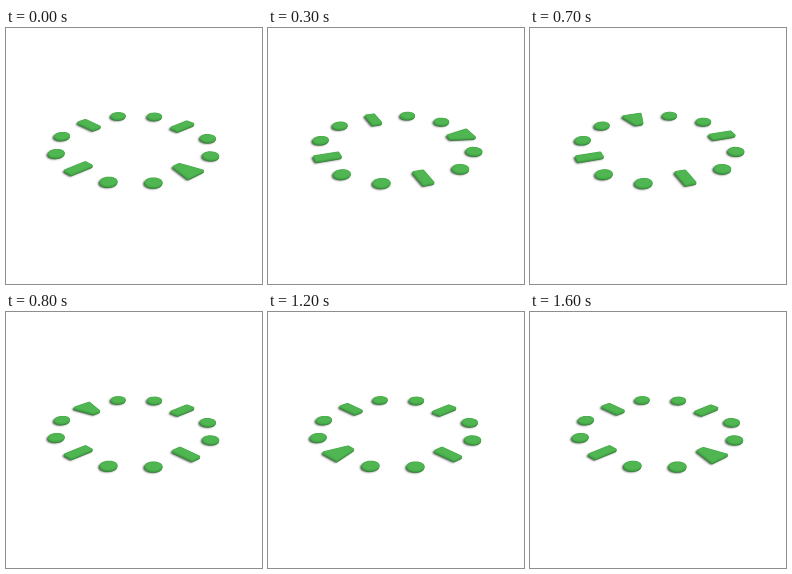
An HTML page with a canvas that plays this animation: 256x256 px, repeating every 1700 ms.

```html
<!DOCTYPE html>
<html lang="en">
<head>
<meta charset="utf-8">
<title>Rotating dial</title>
<style>
  html, body { margin: 0; width: 100%; height: 100%; overflow: hidden; background: #fff; }
  canvas { display: block; width: 256px; height: 256px; }
</style>
</head>
<body>
<canvas id="stage" width="256" height="256"></canvas>
<script>
const ctx = document.getElementById('stage').getContext('2d');
const RAD = Math.PI / 180;
const STEP = 100, LOOP = 1700, TURN = 22.5, START = 47;

// Stacked from the ground up: x shift, y shift, outline width, colour, shadow
const LAYERS = [
  [-0.4, 0.7, 2.8, '#3c7d40', 'rgba(0, 0, 0, 0.5)'],
  [-0.1, 0.1, 2.8, '#3b9a3f', 'transparent'],
  [0.1, -0.6, 2.6, '#48ac4a', 'transparent'],
  [0.2, -0.9, 0.8, '#50b652', 'transparent'],
];

// Perspective view of the ground plane; the dial has radius 1
function project(x, z) {
  const depth = 1 - 0.102 * z;
  return [128 + 71.75 * x / depth, 118.1 + 31.2 * z / depth];
}

const bar = (inner, outer) => [[0.82, -inner], [1.15, -outer], [1.15, outer], [0.82, inner]];

const dot = Array.from({ length: 24 }, (_, i) => [
  1.083 + 0.095 * Math.cos(i * 15 * RAD),
  0.095 * Math.sin(i * 15 * RAD),
]);

const marks = Array.from({ length: 12 }, (_, i) =>
  i === 0 ? bar(0.05, 0.135) : i % 3 ? dot : bar(0.062, 0.062));

function drawMark(shape, angle) {
  const c = Math.cos(angle), s = Math.sin(angle);
  const points = shape.map(([r, w]) => project(r * c - w * s, r * s + w * c));
  for (const [dx, dy, width, colour, shadow] of LAYERS) {
    ctx.beginPath();
    for (const [x, y] of points) ctx.lineTo(x + dx, y + dy);
    ctx.closePath();
    ctx.fillStyle = ctx.strokeStyle = colour;
    ctx.shadowColor = shadow;
    ctx.lineWidth = width;
    ctx.fill();
    ctx.stroke();
  }
}

function render() {
  const step = Math.floor(performance.now() % LOOP / STEP);
  ctx.clearRect(0, 0, 256, 256);
  ctx.lineJoin = 'round';
  ctx.shadowBlur = 2;
  ctx.shadowOffsetX = -1.3;
  ctx.shadowOffsetY = 0.4;
  marks.forEach((shape, i) => drawMark(shape, (START - TURN * step + 30 * i) * RAD));
  requestAnimationFrame(render);
}
render();
</script>
</body>
</html>
```
